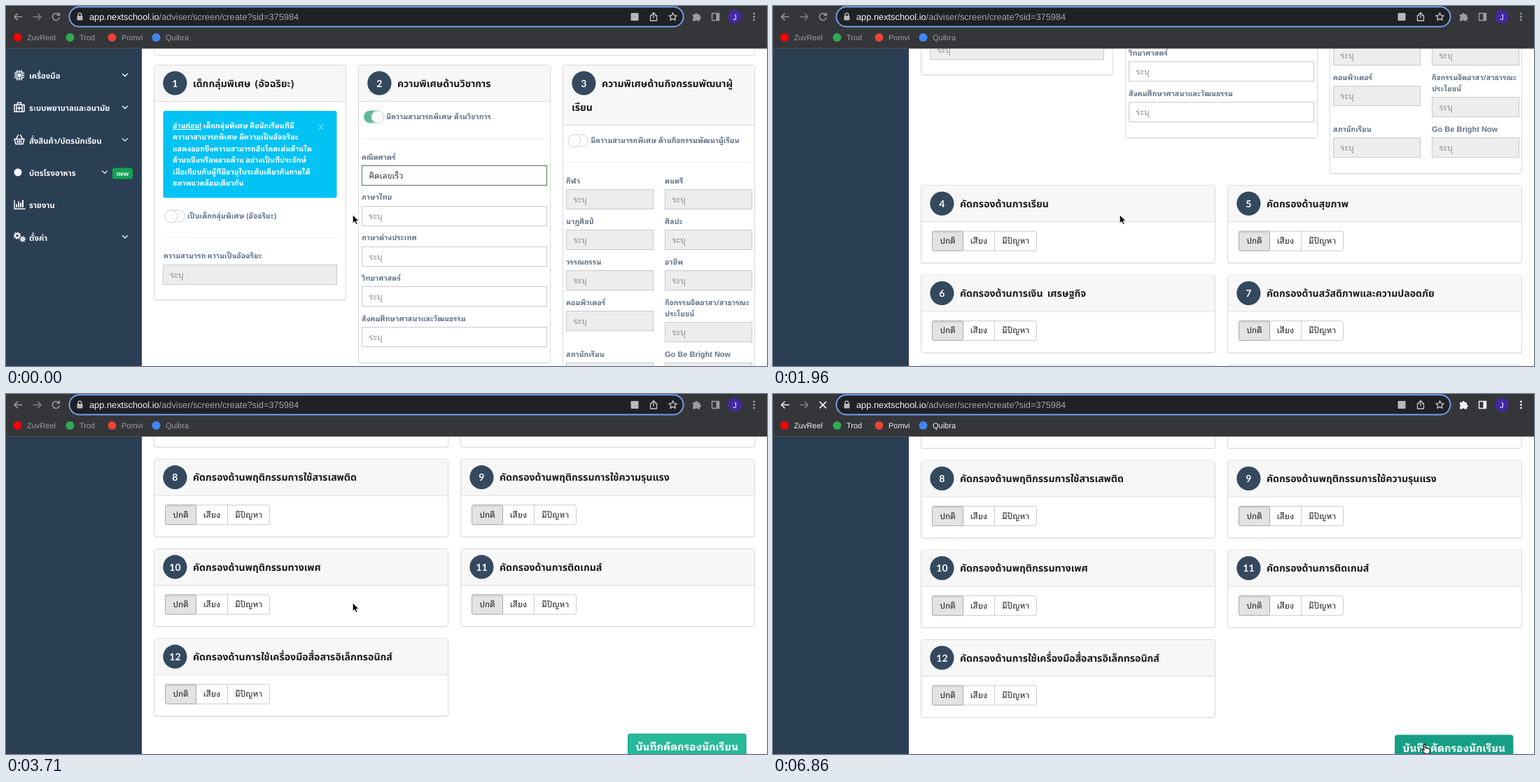
Recreate the animation shown at these times as an HTML page. Size 1087 by 515 pixels, loop 6930 ms.

```html
<!DOCTYPE html>
<html lang="th">
<head>
<meta charset="utf-8">
<title>Screening form</title>
<style>
html, body { margin: 0; width: 100%; height: 100%; overflow: hidden; background: #fff; }
svg { display: block; width: 1087px; height: 515px; }
text { white-space: pre; text-rendering: geometricPrecision; }
.ui { font-family: "Liberation Sans", Arial, sans-serif; }
.title, .menu { font-family: "Noto Sans Thai", "Noto Sans", sans-serif; font-weight: 600; }
.title { font-size: 14.1px; fill: #1c1c1c; word-spacing: 2.5px; }
.menu { font-size: 11.4px; fill: #f2f5f7; }
.body, .label, .alert, .save { font-family: "Noto Sans Thai Looped", "Noto Looped Thai", "Noto Sans Thai", "Noto Sans", sans-serif; }
.body { font-size: 11.8px; }
.label, .alert { font-size: 10.3px; font-weight: 600; fill: #62758a; }
.alert { fill: #fff; }
.save { font-size: 14.8px; font-weight: 600; fill: #fff; }
.latin { font: bold 11px "Liberation Sans", Arial, sans-serif; fill: #62758a; }
.badge { font: bold 14px Lato, "Open Sans", sans-serif; fill: #fff; text-anchor: middle; }
.line { fill: none; stroke: currentColor; stroke-linecap: round; stroke-linejoin: round; }
</style>
</head>
<body>
<svg viewBox="0 0 1087 515">
  <rect width="1087" height="515" fill="#fff"/>
  <rect y="61" width="194" height="454" fill="#2a3f54"/>
  <g id="page"></g>
  <g id="browser"></g>
  <circle id="ring" r="17.5" fill="#fff" fill-opacity=".12" stroke="#111" stroke-width="1.6"/>
  <g id="cursor">
    <path id="arrow" d="M0 0V12.2L2.8 9.6 4.7 13.8 6.8 12.9 5 8.8H8.8Z" fill="#000" stroke="#fff" stroke-width=".9"/>
    <path id="hand" d="M-1.8-6Q-.6-7.6.5-6V-1.3Q2-2.1 3-.8 4.4-1.3 5.2 0 6.6-.2 6.8 1.2V3.2Q6.6 5 5.5 7H-.6L-4.5 2Q-5 .2-3.5.2L-1.8 1.8Z" fill="#fff" stroke="#000" stroke-width="1.1"/>
  </g>
</svg>
<script>
const $ = id => document.getElementById(id);
const FRAME = 70, LOOP = 99 * FRAME;

const text = (cls, x, y, str, extra = '') => `<text class="${cls}" x="${x}" y="${y}" ${extra}>${str}</text>`;
const rect = (x, y, w, h, fill, stroke = 'none', r = 0, width = 1) =>
  `<rect x="${x}" y="${y}" width="${w}" height="${h}" rx="${r}" fill="${fill}" stroke="${stroke}" stroke-width="${width}"/>`;
const circle = (x, y, r, fill, stroke = 'none') => `<circle cx="${x}" cy="${y}" r="${r}" fill="${fill}" stroke="${stroke}"/>`;
const line = (d, width = 1.4, color = '') => `<path class="line" d="${d}" stroke-width="${width}" ${color && `color="${color}"`}/>`;
const rule = (x, y, w) => rect(x, y, w, 1, '#eee');

function card(x, y, w, h, number, titles, head = 52) {
  return rect(x + .5, y + 1.5, w, h, '#e9e9e9', 'none', 3) +
    rect(x + .5, y + .5, w, h, '#fff', '#d9d9d9', 3) +
    rect(x + 1, y + 1, w - 1, head - 1, '#f7f7f7', 'none', 2) +
    rect(x + 1, y + head, w - 1, 1, '#dcdcdc') +
    circle(x + 30.4, y + 26.4, 17.1, '#34495e') +
    text('badge', x + 30.4, y + 31.5, number) +
    titles.map((s, i) => text('title', x + (i ? 13 : 56), y + 31.5 + i * 34, s)).join('');
}

function toggle(x, y, on, label) {
  return rect(x + .5, y - 8.5, 28, 17, on ? '#5fb89b' : '#fff', on ? '#5fb89b' : '#d5d5d5', 8.5) +
    circle(x + (on ? 20 : 9), y + .3, 9, '#fff', '#cfcfcf') + text('label', x + 32, y + 3.5, label);
}

function field(x, y, w, { value = '', disabled = false } = {}) {
  return rect(x + .5, y + .5, w, 28, disabled ? '#ededed' : '#fff', value ? '#4b7d4c' : '#c9c9c9') +
    text('body', x + 10.5, y + 19, value || 'ระบุ', `fill="${value ? '#333' : '#8d8d8d'}"`);
}

function choices(x, y) {
  return rect(x + .5, y + .5, 149, 28, '#fff', '#ccc', 3) +
    rect(x + .5, y + .5, 44, 28, '#e3e3e3', '#a9a9a9', 2) + rect(x + 1, y + 1, 43, 2, '#d2d2d2') +
    rect(x + 89, y, 1, 29, '#ccc') +
    ['ปกติ', 'เสี่ยง', 'มีปัญหา'].map((s, i) =>
      text('body', x + [22.5, 67, 119.5][i], y + 18.5, s, 'fill="#222" text-anchor="middle"')).join('');
}

function sidebar() {
  const items = ['เครื่องมือ', 'ระบบพยาบาลและอนามัย', 'สั่งสินค้า/บัตรนักเรียน', 'บัตรโรงอาหาร', 'รายงาน', 'ตั้งค่า'];
  const gear = (x, y, r) => `<circle class="line" cx="${x}" cy="${y}" r="${r}" stroke-width="2"/>` +
    `<circle class="line" cx="${x}" cy="${y}" r="${r + 1.8}" stroke-width="1.6" style="stroke-linecap:butt" pathLength="16" stroke-dasharray="1 1"/>`;
  const icons = [
    rect(-5, -5, 10, 10, 'none', '#fff', 1) + rect(-2, -2, 4, 4, '#fff') +
      line('M-3-7V7M0-7V7M3-7V7M-7-3H-5M-7 0H-5M-7 3H-5M5-3H7M5 0H7M5 3H7', 1.2),
    line('M-7-4H7V6H-7ZM-4-4V6M4-4V6M-2.5-4V-7H2.5V-4M0-1.5V3.5M-2.5 1H2.5', 1.5),
    line('M-7-1H7L5 6H-5ZM-5-1L-1.5-7M5-1L1.5-7M-2.5 1V4M0 1V4M2.5 1V4', 1.5),
    circle(-2, 0, 5.5, '#fff'),
    line('M-7-6V6H8') + line('M-4 3V0M-1 3V-4M2 3V-2M5 3V-6', 2),
    gear(-3, -2, 2.8) + gear(5, 3, 1.8)
  ];
  return '<g color="#fff">' + items.map((s, i) => {
    const y = 99.5 + i * 46.3, x = i === 3 ? 141 : 170;
    return `<g transform="translate(19 ${y - .5})">${icons[i]}</g>` + text('menu', 33, y + 4.5, s) +
      (i === 4 ? '' : line(`M${x - 3.5} ${y - 2.5}l3.5 3.5 3.5-3.5`, 1.3));
  }).join('') + rect(152, 231.5, 29, 16, '#12a150', 'none', 3) +
    text('ui', 166.5, 242.5, 'new', 'fill="#fff" font-size="9" font-weight="bold" text-anchor="middle"') + '</g>';
}

function giftedCard() {
  const lines = [
    '<tspan text-decoration="underline">อ่านก่อน!</tspan> เด็กกลุ่มพิเศษ คือนักเรียนที่มี',
    'ความาสามารถพิเศษ มีความเป็นอัจฉริยะ',
    'แสดงออกซึ่งความสามารถอันโดดเด่นด้านใด',
    'ด้านหนึ่งหรือหลายด้าน อย่างเป็นที่ประจักษ์',
    'เมื่อเทียบกับผู้ที่มีอายุในระดับเดียวกันภายใต้',
    'สภาพแวดล้อมเดียวกัน'
  ];
  return card(211, 84, 274, 336, 1, ['เด็กกลุ่มพิเศษ (อัจฉริยะ)']) +
    rect(224.5, 150, 248, 124.5, '#03c2f4', 'none', 3) +
    lines.map((s, i) => text('alert', 238, 175 + i * 16.4, s)).join('') +
    line('M447 170l6 6M453 170l-6 6', 2, '#59d3f5') +
    toggle(227, 300.5, false, 'เป็นเด็กกลุ่มพิเศษ (อัจฉริยะ)') + rule(225, 331, 247) +
    text('label', 225, 361, 'ความสามารถ ความเป็นอัจฉริยะ') + field(224, 370, 248, { disabled: true });
}

function academicCard() {
  const labels = ['คณิตศาตร์', 'ภาษาไทย', 'ภาษาต่างประเทศ', 'วิทยาศาสตร์', 'สังคมศึกษาศาสนาและวัฒนธรรม'];
  return card(503, 84, 274, 426, 2, ['ความพิเศษด้านวิชาการ']) +
    toggle(511, 158.5, true, 'มีความสามารถพิเศษ ด้านวิชาการ') + rule(508, 189, 265) +
    labels.map((s, i) => text('label', 508, 219.5 + i * 57.8, s) +
      field(508, Math.round(228 + i * 57.8), 264, { value: i ? '' : 'คิดเลขเร็ว' })).join('');
}

function activityCard() {
  const rows = [['กีฬา', 'ดนตรี'], ['นาฏศิลป์', 'ศิลปะ'], ['วรรณกรรม', 'อาชีพ'], ['คอมพิวเตอร์', 'กิจกรรมจิตอาสา/สาธารณะ']];
  const cell = (x, y, label, gap = 0, cls = 'label') =>
    text(cls, x, y + 3.5, label) + field(x, y + 12 + gap, 124, { disabled: true });
  return card(795, 84, 274, 477, 3, ['ความพิเศษด้านกิจกรรมพัฒนาผู้', 'เรียน'], 86) +
    toggle(803, 192.5, false, 'มีความสามารถพิเศษ ด้านกิจกรรมพัฒนาผู้เรียน') + rule(800, 223, 265) +
    rows.map(([a, b], i) => cell(800, 250 + i * 58, a) + cell(941, 250 + i * 58, b, i === 3 ? 16 : 0)).join('') +
    text('label', 941, 443.5, 'ประโยชน์') +
    cell(800, 498, 'สภานักเรียน') + cell(941, 498, 'Go Be Bright Now', 0, 'latin');
}

function screeningCards() {
  const topics = ['การเรียน', 'สุขภาพ', 'การเงิน เศรษฐกิจ', 'สวัสดิภาพและความปลอดภัย', 'พฤติกรรมการใช้สารเสพติด',
    'พฤติกรรมการใช้ความรุนแรง', 'พฤติกรรมทางเพศ', 'การติดเกมส์', 'การใช้เครื่องมือสื่อสารอิเล็กทรอนิกส์'];
  return topics.map((s, i) => {
    const x = i % 2 ? 649 : 211, y = 578 + (i >> 1) * 128.25;
    return card(x, y, 420, 111, i + 4, ['คัดกรองด้าน' + s]) + choices(x + 16, y + 65.5);
  }).join('');
}

function browser() {
  const bookmarks = [['ZuvReel', 30, '#f00'], ['Trod', 105, '#34a853'], ['Pomvi', 165, '#ea4335'], ['Quibra', 228, '#4285f4']];
  return rect(0, 0, 1087, 61, '#35363a') + rect(0, 60, 1087, 1, '#584a4d') +
    rect(90.5, 1.2, 877, 28.3, '#202124', '#719fec', 14.2, 2) +
    text('ui', 119, 19.5, 'app.nextschool.io<tspan fill="#a2a6ab">/adviser/screen/create?sid=375984</tspan>', 'font-size="12.8" fill="#f1f3f4"') +
    '<g color="#c4c7cb">' + rect(101.5, 14, 8, 6.5, '#b5b8bc', 'none', 1) + line('M103 14V12.5a2.4 2.4 0 0 1 4.8 0V14', 1.3) +
    rect(892.5, 10, 11, 11, '#b5b8bc', 'none', 1) +
    line('M922.5 13.5H920.5V21H929.5V13.5H927.5M925 17V9.5M922.5 12L925 9.5 927.5 12', 1.3) +
    line('M952.5 9.7L954.2 13.4 958.2 13.8 955.2 16.5 956.1 20.5 952.5 18.4 948.9 20.5 949.8 16.5 946.8 13.8 950.8 13.4Z', 1.3) + '</g>' +
    line('M50 15.5H39M45.5 11L50 15.5 45.5 20', 1.5, '#7f8388') +
    circle(1041, 15.5, 9.7, '#4328a3') + text('ui', 1041, 19.5, 'J', 'fill="#fff" font-size="11" text-anchor="middle"') +
    '<g id="controls">' + line('M22.5 15.5H12M16.5 11L12 15.5 16.5 20', 1.6) +
    `<g id="reload">${line('M75.5 12.5a5 5 0 1 0 .7 4.5M76.3 10V13.2H73', 1.5)}</g>` +
    `<g id="stop">${line('M67 11.3l8.5 8.5M75.5 11.3l-8.5 8.5', 1.7)}</g>` +
    '<path fill="currentColor" d="M981 12h3.2a1.9 1.9 0 0 1 3.8 0h3v3.2a1.9 1.9 0 0 1 0 3.8V21.5h-3.4a1.7 1.7 0 0 0-3.2 0H981V18a1.7 1.7 0 0 0 0-3Z"/>' +
    line('M1008.5 10.5H1018.5V20.5H1008.5Z', 1.5) + rect(1014.5, 10.5, 4.5, 10, 'currentColor') +
    [11, 15.5, 20].map(y => circle(1068.5, y, 1.4, 'currentColor')).join('') +
    bookmarks.map(([s, x]) => text('ui', x, 48.7, s, 'fill="currentColor" font-size="11"')).join('') + '</g>' +
    bookmarks.map(([, x, fill]) => circle(x - 13.5, 45, 6, fill)).join('');
}

$('page').innerHTML = sidebar() + rect(211.5, 40.5, 858, 30, '#fff', '#dedede', 3) +
  giftedCard() + academicCard() + activityCard() + screeningCards() +
  '<rect id="save" x="888.5" y="1228" width="168.5" height="40" rx="3" stroke="#169f85"/>' +
  text('save', 972.5, 1252, 'บันทึกคัดกรองนักเรียน', 'text-anchor="middle"');
$('browser').innerHTML = browser();

// time, scroll position, speed per ms
const scrollKeys = [[770, 0, .1], [1470, 187.2, .28], [2450, 434.4, .19], [3010, 524.4, .22], [3710, 741.7, 0], [4340, 740, 0]];

function scrollAt(t) {
  if (t <= scrollKeys[0][0]) return 0;
  const i = scrollKeys.findIndex(k => t < k[0]);
  if (i < 0) return 740;
  const [t0, p0, v0] = scrollKeys[i - 1], [t1, p1, v1] = scrollKeys[i];
  const d = t1 - t0, u = (t - t0) / d, w = 1 - u;
  return w * w * ((1 + 2 * u) * p0 + u * d * v0) + u * u * ((3 - 2 * u) * p1 - w * d * v1);
}

const ease = (t, from, to) => {
  const u = Math.min(1, Math.max(0, (t - from) / (to - from)));
  return u * u * (3 - 2 * u);
};
const show = (id, on) => $(id).setAttribute('display', on ? 'inline' : 'none');

function draw(now) {
  const t = Math.floor(now % LOOP / FRAME) * FRAME;
  const travel = ease(t, 4410, 5250), drift = ease(t, 5740, 6090);
  const x = 495.2 + 445 * travel - 8.5 * drift, y = 298.7 + 202.5 * travel + 6.5 * drift;
  const active = t >= 5460, hover = t >= 5810, loading = t >= 6510;

  $('page').setAttribute('transform', `translate(0 ${-scrollAt(t).toFixed(2)})`);
  $('cursor').setAttribute('transform', `translate(${x} ${y})`);
  $('ring').setAttribute('transform', `translate(${x - .5} ${y})`);
  $('controls').setAttribute('color', active ? '#f1f3f4' : '#9a9da2');
  $('save').setAttribute('fill', hover ? '#169f85' : '#26b99a');
  show('ring', t >= 5320 && t < 5600);
  show('arrow', !hover);
  show('hand', hover);
  show('reload', !loading);
  show('stop', loading);
  requestAnimationFrame(() => draw(performance.now()));
}
draw(performance.now());
</script>
</body>
</html>
```
